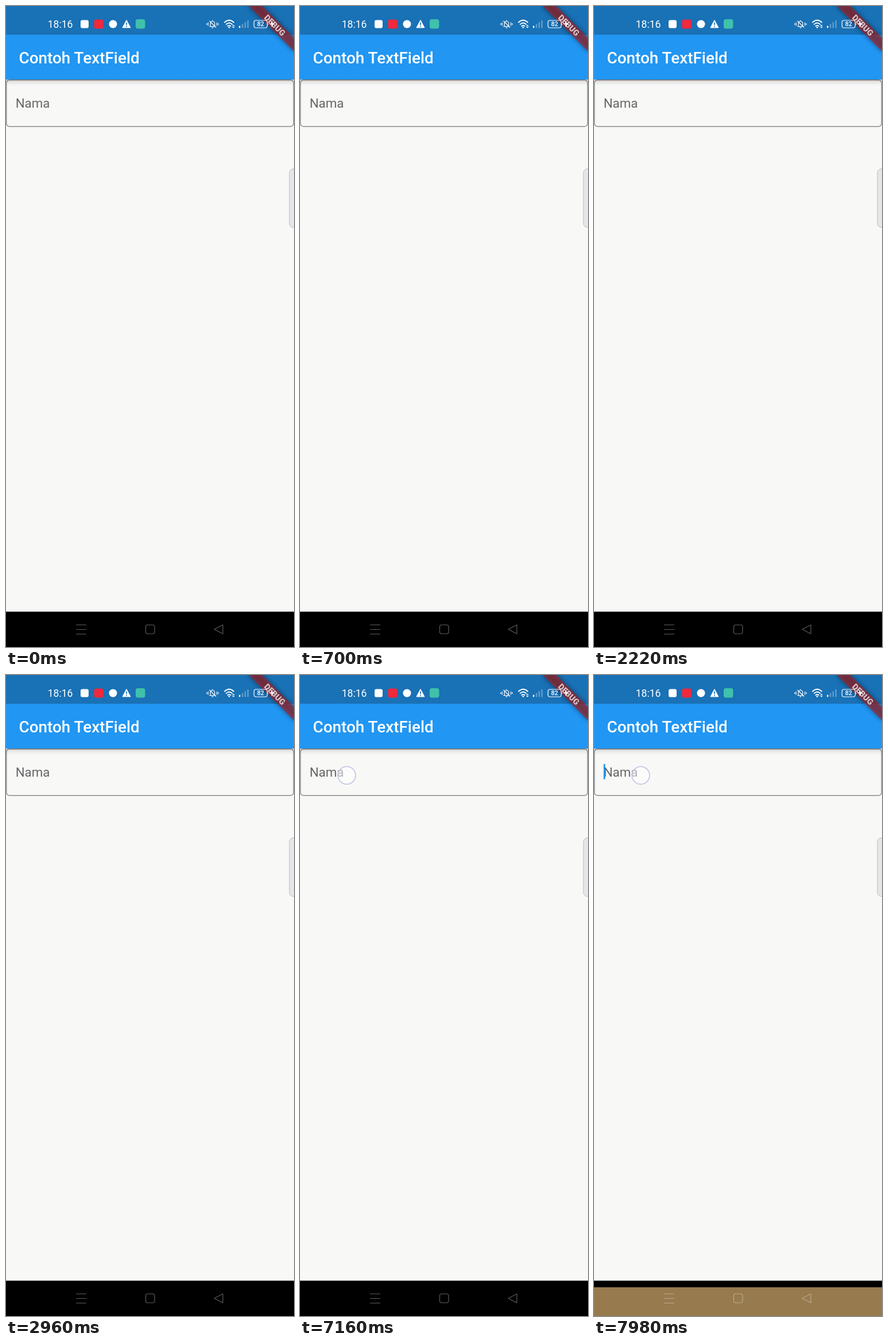
Recreate the animation shown at these times as an HTML page. Size 502 px wide and 1116 px high, loop 8 s.

```html
<!DOCTYPE html>
<html lang="id">
<head>
<meta charset="utf-8">
<title>Contoh TextField</title>
<style>
  html, body { margin: 0; width: 100%; height: 100%; overflow: hidden; background: #f8f8f7; }
  svg { display: block; width: 502px; height: 1116px; font-family: Roboto, sans-serif; }
  .line { fill: none; stroke: #fff; stroke-width: 1.2; stroke-linecap: round; stroke-linejoin: round; }
</style>
</head>
<body>
<svg viewBox="0 0 502 1116">
  <defs>
    <linearGradient id="shade" x2="0" y2="1">
      <stop offset="0" stop-opacity=".2"/>
      <stop offset=".4" stop-opacity=".07"/>
      <stop offset="1" stop-opacity="0"/>
    </linearGradient>
    <filter id="blur" x="-50%" y="-150%" width="200%" height="400%"><feGaussianBlur stdDeviation="4.5"/></filter>
  </defs>

  <rect width="502" height="1116" fill="#f8f8f7"/>

  <!-- text field -->
  <rect x=".7" y="128.8" width="500.6" height="81" rx="5.5" fill="none" stroke="#8c8c8c" stroke-width="1.4"/>
  <text x="16.7" y="177" font-size="22.3" fill="#666">Nama</text>
  <rect id="caret" x="16.7" y="155" width="2.8" height="26.5" fill="#2196f3"/>

  <!-- app bar -->
  <rect y="128" width="502" height="11" fill="url(#shade)"/>
  <rect width="502" height="128" fill="#2196f3"/>
  <rect width="502" height="50" fill="#1971b6"/>
  <text x="22.5" y="100" font-size="27.9" font-weight="500" fill="#fff">Contoh TextField</text>

  <!-- corner banner -->
  <g transform="translate(502 0) rotate(45)">
    <rect x="-56" y="39" width="112" height="16.8" opacity=".45" filter="url(#blur)"/>
    <rect x="-80" y="39" width="160" height="16.8" fill="#b71c1c" fill-opacity=".58"/>
    <text y="52.3" font-size="14.2" font-weight="900" text-anchor="middle" fill="#fff" fill-opacity=".72">DEBUG</text>
  </g>

  <!-- status bar -->
  <g fill="#fff">
    <text x="72.7" y="38" font-size="17.6">18:16</text>
    <rect x="130" y="24.5" width="14" height="14" rx="3"/>
    <rect x="153.5" y="23.5" width="16" height="16" rx="3.5" fill="#f2283c"/>
    <circle cx="186.5" cy="31.5" r="7"/>
    <path d="M210 24.6L217 37.8H203Z" stroke="#fff" stroke-linejoin="round"/>
    <path d="M210 28.7v4.6m0 1.4v1.7" stroke="#1971b6" stroke-width="1.7"/>
    <rect x="226" y="23" width="16.5" height="16.5" rx="4" fill="#3fc1ab"/>

    <g class="line">
      <path d="M355 35.6h10M356.2 35.4v-4.6c0-5.4 7.6-5.4 7.6 0v4.6M360 26v-1M359 37.8h2M354.8 26.3L365.8 37"/>
      <path d="M352.3 29v5m-2.4-3.6v2.2M367.7 29v5m2.4-3.6v2.2"/>
      <path d="M381 28.5q8-7.5 16 0M383.8 31.8q5.2-4.6 10.4 0M386.4 35q2.6-2.2 5.2 0" stroke-width="1.8"/>
      <rect x="432.3" y="25" width="23" height="13" rx="3.5"/>
    </g>
    <circle cx="389" cy="37.3" r="1.4"/>
    <path d="M394 34.8l2.4-2.4 2.4 2.4zM394 36l2.4 2.4 2.4-2.4z"/>
    <rect x="406" y="34.5" width="2.4" height="3.8" rx="1"/>
    <path d="M411 31.5h2.4v6.8H411zM415.7 28.3h2.4v10h-2.4zM420.5 25h2.4v13.3h-2.4z" opacity=".32"/>
    <text x="443.8" y="35.3" font-size="10.6" font-weight="500" text-anchor="middle">82</text>
    <path d="M456.5 29.5v4q1.8-2 0-4zM464.5 25.5l-4.2 6.7h3l-.8 5 5.2-7.2h-3.2z"/>
  </g>

  <!-- edge handle -->
  <rect x="494" y="283.5" width="18" height="102" rx="7" fill="#e6e6e8" stroke="#bcbcc3"/>

  <!-- touch marker -->
  <circle id="touch" cx="81.5" cy="174.8" r="15.4" fill="#fff" fill-opacity=".5" stroke="#c3c8e4" stroke-width="1.7"/>

  <!-- navigation bar -->
  <rect y="1054.5" width="502" height="62"/>
  <rect id="panel" width="502" height="62" fill="#977a4e"/>
  <g class="line" stroke-opacity=".36">
    <path d="M122.5 1077.5h17m-17 8h17m-17 8h17"/>
    <rect x="243.5" y="1077.5" width="15.5" height="15.5" rx="3.5"/>
    <path d="M378 1077.5v15.5L363 1085.2Z"/>
  </g>
</svg>
<script>
  const LOOP = 8000, FLOOR = 1116;
  const [caret, touch, panel] = ["caret", "touch", "panel"].map(id => document.getElementById(id));
  const show = (el, on) => el.setAttribute("visibility", on ? "visible" : "hidden");
  const clamp = v => Math.min(1, Math.max(0, v));

  // The panel rises quickly, rests, then nudges up once more.
  const panelTop = t => t >= 7980 ? 1066 : FLOOR - 46 * clamp((t - 7760) / 100);

  function draw(now) {
    const t = now % LOOP;
    show(touch, t >= 5340);
    show(caret, t >= 7700);
    panel.setAttribute("y", panelTop(t));
    requestAnimationFrame(draw);
  }
  draw(performance.now());
</script>
</body>
</html>
```
